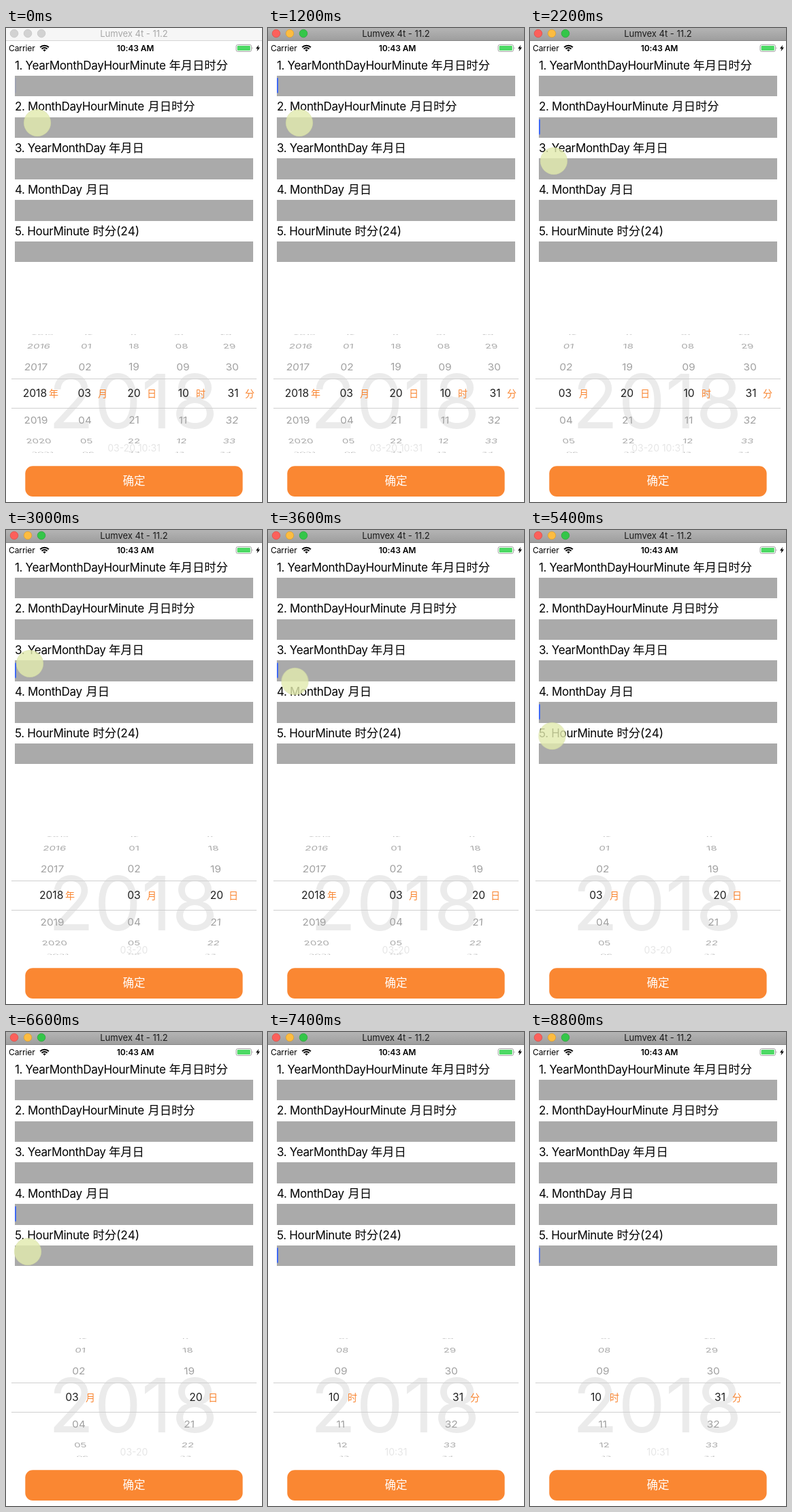
Recreate the animation shown at these times as an HTML page. Size 376 px wide and 695 px high, loop 9000 ms.

```html
<!DOCTYPE html>
<html lang="zh">
<head>
<meta charset="utf-8">
<title>Date picker</title>
<style>
html, body { margin: 0; width: 100%; height: 100%; overflow: hidden; background: #fff; }
svg { display: block; width: 376px; height: 695px; font-family: Inter, "Noto Sans CJK SC", "Noto Sans CJK", sans-serif; }
.mid { text-anchor: middle; }
.label { font-size: 17px; letter-spacing: -.02em; }
.han { font-size: 17.3px; }
.num { font-size: 15.6px; text-anchor: middle; }
.unit { font-size: 14px; text-anchor: middle; fill: #f98530; }
.hint { font-size: 14px; text-anchor: middle; fill: #e6e6e6; }

.active, .picker, #caret, #touch { animation: 9s step-end infinite; }
.active { animation-name: activate; }
#caret { animation-name: caret; }
#touch { animation-name: touch; }
.p0 { animation-name: p0; }
.p1 { animation-name: p1; }
.p2 { animation-name: p2; }
.p3 { animation-name: p3; }
.p4 { animation-name: p4; }

@keyframes activate { 0% { opacity: 0 } 13.33% { opacity: 1 } }
@keyframes p0 { 0% { opacity: 1 } 17.77% { opacity: 0 } }
@keyframes p1 { 0% { opacity: 0 } 17.77% { opacity: 1 } 33.33% { opacity: 0 } }
@keyframes p2 { 0% { opacity: 0 } 33.33% { opacity: 1 } 53.33% { opacity: 0 } }
@keyframes p3 { 0% { opacity: 0 } 53.33% { opacity: 1 } 79.99% { opacity: 0 } }
@keyframes p4 { 0% { opacity: 0 } 79.99% { opacity: 1 } }

@keyframes caret {
  0% { opacity: .1; transform: translateY(0) }
  6.66% { opacity: .5 }
  8.88% { opacity: 1 }
  17.77% { opacity: 1; transform: translateY(60.8px) }
  26.66% { opacity: .5 }
  28.88% { opacity: 0 }
  33.33% { opacity: 1; transform: translateY(121.6px) }
  42.22% { opacity: .5 }
  44.44% { opacity: 0 }
  53.33% { opacity: 1; transform: translateY(182.4px) }
  62.22% { opacity: .5 }
  64.44% { opacity: 0 }
  71.11% { opacity: .5 }
  73.33% { opacity: 1 }
  79.99% { opacity: 1; transform: translateY(243.2px) }
  88.88% { opacity: .5 }
  91.11% { opacity: 0 }
  97.77% { opacity: .7 }
}
@keyframes touch {
  0% { opacity: 1; transform: translate(46px, 139px) }
  19.99% { transform: translate(44px, 151px) }
  22.22% { transform: translate(39px, 175px) }
  24.44% { transform: translate(35px, 195px) }
  26.66% { transform: translate(35px, 196px) }
  35.55% { transform: translate(36px, 199px) }
  39.99% { transform: translate(39.5px, 222px) }
  42.22% { transform: translate(37px, 245px) }
  44.44% { transform: translate(33px, 262px) }
  46.66% { transform: translate(32px, 270px) }
  57.77% { transform: translate(32px, 284px) }
  59.99% { transform: translate(32.5px, 302px) }
  62.22% { transform: translate(32px, 314px) }
  64.44% { transform: translate(32px, 320px) }
  66.66% { transform: translate(32px, 322px) }
  82.22% { opacity: 0; transform: translate(32px, 322px) }
}
</style>
</head>
<body>
<svg viewBox="0 0 376 695">
  <defs>
    <linearGradient id="bar" x2="0" y2="1">
      <stop stop-color="#b4b4b4"/><stop offset="1" stop-color="#9d9d9d"/>
    </linearGradient>
    <clipPath id="window"><rect x="0" y="449" width="376" height="173.5"/></clipPath>
  </defs>

  <g font-size="13">
    <rect width="376" height="19" fill="#f6f6f6"/>
    <path d="M0 18.5H376" stroke="#d6d6d6"/>
    <g fill="#d2d2d2" stroke="#c2c2c2" stroke-width=".7">
      <circle cx="12" cy="8" r="5.8"/><circle cx="32" cy="8" r="5.8"/><circle cx="52" cy="8" r="5.8"/>
    </g>
    <text class="mid" x="188" y="13" fill="#a8a8a8">Lumvex 4t - 11.2</text>
  </g>
  <g class="active" font-size="13">
    <rect width="376" height="19" fill="url(#bar)"/>
    <path d="M0 18.5H376" stroke="#858585"/>
    <g stroke-width=".7">
      <circle cx="12" cy="8" r="5.8" fill="#fc605b" stroke="#dc4a43"/>
      <circle cx="32" cy="8" r="5.8" fill="#fdbc40" stroke="#d99d2c"/>
      <circle cx="52" cy="8" r="5.8" fill="#34c649" stroke="#24a436"/>
    </g>
    <text class="mid" x="188" y="13" fill="#1a1a1a">Lumvex 4t - 11.2</text>
  </g>

  <g font-size="12">
    <text x="4" y="33.8" letter-spacing="-.1">Carrier</text>
    <g fill="none" stroke="#000" stroke-width="2">
      <path d="M50.2 28.3A9 9 0 0 1 62.8 28.3M52.5 30.8A5.6 5.6 0 0 1 60.5 30.8"/>
      <path d="M56.5 34.6L54.4 32.4A3 3 0 0 1 58.6 32.4Z" fill="#000" stroke="none"/>
    </g>
    <text class="mid" x="190" y="33.8" font-weight="600" letter-spacing="-.1">10:43 AM</text>
    <rect x="338" y="24.5" width="22.5" height="10" rx="2.4" fill="none" stroke="#9a9a9a" stroke-width=".9"/>
    <rect x="339.6" y="26" width="19.2" height="7" rx="1" fill="#4cd964"/>
    <path d="M361.7 27.6Q363.4 29.5 361.7 31.4Z" fill="#9a9a9a"/>
    <path d="M371.3 24.8L367 30.2H369.6L368.6 34.2L373 28.6H370.3Z"/>
  </g>

  <g id="form"></g>
  <rect id="caret" x="13" y="73" width="2" height="22.5" rx="1" fill="#3f69f3"/>

  <text class="mid" x="187" y="586.5" font-size="110" fill="#ebebeb">2018</text>
  <path d="M8 514.5H368M8 557.5H368" stroke="#cfcfcf"/>
  <g id="pickers"></g>

  <rect x="28.3" y="642.3" width="319.3" height="44.6" rx="11" fill="#fa8732"/>
  <text class="mid" x="188" y="670.2" font-size="16.5" fill="#fff">确定</text>

  <circle id="touch" r="19.7" fill="#e2eaae" fill-opacity=".81" stroke="#d3dba0" stroke-opacity=".6" stroke-width=".8"/>
</svg>
<script>
const labels = [
  ['1. YearMonthDayHourMinute', 239.5, '年月日时分'],
  ['2. MonthDayHourMinute', 208.5, '月日时分'],
  ['3. YearMonthDay', 151, '年月日'],
  ['4. MonthDay', 117.5, '月日'],
  ['5. HourMinute', 127.5, '时分(24)']
];
document.getElementById('form').innerHTML = labels.map(([text, x, han], i) => {
  const y = i * 60.8, top = Math.round(69.7 + y), bottom = Math.round(100.2 + y);
  return `<text class="label" x="13" y="${60.6 + y}">${text}</text>
    <text class="han" x="${x}" y="${60.6 + y}">${han}</text>
    <rect x="13" y="${top}" width="350" height="${bottom - top}" fill="#aaa"/>`;
}).join('');

// unit: [selected value, first value, count]
const wheels = {
  年: [2018, 1970, 200], 月: [3, 1, 12], 日: [20, 1, 31], 时: [10, 0, 24], 分: [31, 0, 60]
};
const pickers = [
  ['年月日时分', '03-20 10:31'],
  ['月日时分', '03-20 10:31'],
  ['年月日', '03-20'],
  ['月日', '03-20'],
  ['时分', '10:31']
];
const CX = 188, CY = 535.8, R = 88.5, STEP = 26 * Math.PI / 180;
const MAX_PITCH = 164;
const shades = ['#1f1f1f', '#a0a0a0', '#a9a9a9', '#b0b0b0'];

// One number on the drum, flattened and leaning with its angle.
function cell(dx, row, [value, first, count]) {
  const a = row * STEP, s = 1 - .1 * (1 - Math.cos(a));
  const lean = -dx * .1 * Math.sin(a) / R;
  const n = first + (value - first + row + count) % count;
  const m = [s, 0, lean, Math.cos(a), CX + dx * s, CY + R * Math.sin(a)];
  return `<text class="num" y="5.6" fill="${shades[Math.abs(row)]}"
    transform="matrix(${m})">${String(n).padStart(2, '0')}</text>`;
}

// The selected row spreads over the full width; the drums stay within MAX_PITCH.
function picker([units, hint], k) {
  const n = units.length, pitch = 364 / n;
  const cols = [...units].map((u, i) => {
    const slot = i - (n - 1) / 2;
    const rows = [-3, -2, -1, 0, 1, 2, 3].map(r =>
      cell(slot * (r ? Math.min(pitch, MAX_PITCH) : pitch), r, wheels[u]));
    return rows.join('') + `<text class="unit" x="${214 + slot * 360 / n}" y="541.2">${u}</text>`;
  });
  return `<g class="picker p${k}"><text class="hint" x="${CX}" y="621">${hint}</text>
    <g clip-path="url(#window)">${cols.join('')}</g></g>`;
}
document.getElementById('pickers').innerHTML = pickers.map(picker).join('');
</script>
</body>
</html>
```
